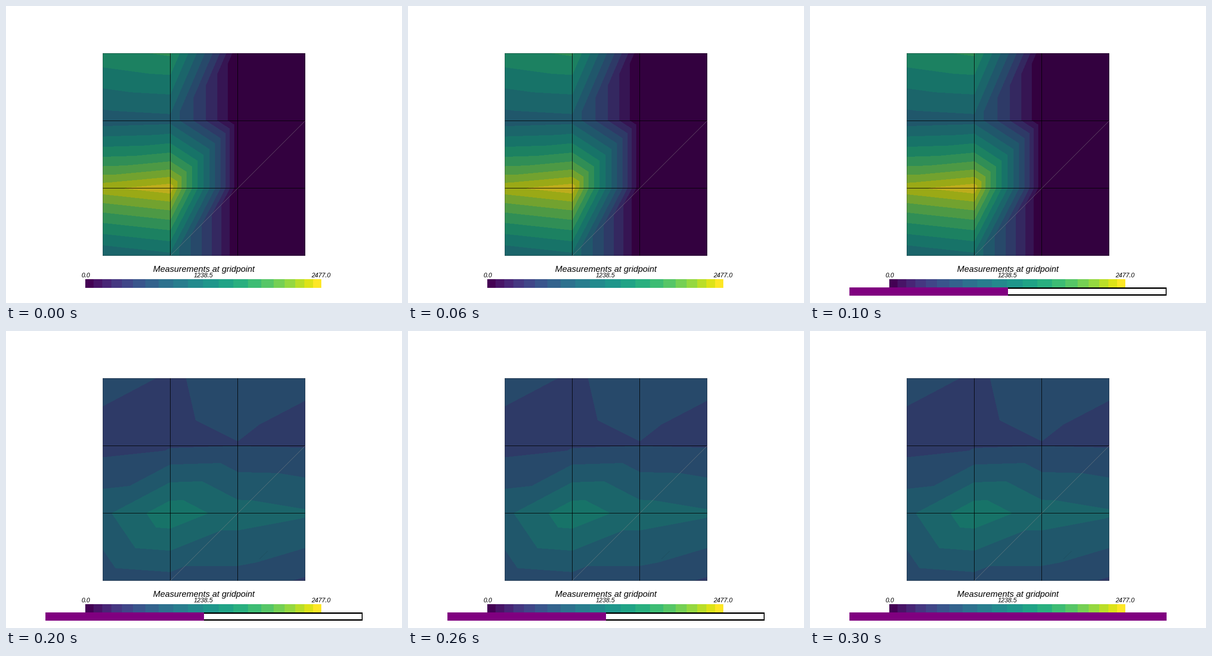
A matplotlib script that plays this animation: 864x648 px, repeating every 0.4 s.

```python
import numpy as np
import matplotlib.pyplot as plt
from matplotlib.animation import FuncAnimation
from matplotlib.patches import Rectangle
from matplotlib.tri import Triangulation

W, H = 864, 648
LEFT, RIGHT, TOP, BOTTOM = 211, 653, 103, 545
N = 4            # grid points per side
PEAK = 2477
SHADING = 0.75   # the lit surface is darker than the scalar bar

# Measurements at the grid points, bottom row first
FIRST = [[1060, 1200, 0, 0],
         [2338, PEAK, 0, 0],
         [930, 972, 0, 0],
         [1621, 1715, 0, 0]]
SECOND = [[705, 752, 751, 615],
          [990, 1410, 1147, 1073],
          [570, 615, 640, 628],
          [695, 629, 690, 651]]

fig = plt.figure(figsize=(W / 72, H / 72), dpi=72, facecolor="white")
ax = fig.add_axes([0, 0, 1, 1])
ax.axis("off")


def bands(n, bulge, shade=1):
    """Edges from 0 to 1 of n bands, widest in the middle, and their colours."""
    u = np.linspace(0, 1, n + 1)
    edges = u - bulge * np.sin(2 * np.pi * u) / (2 * np.pi)
    colors = plt.get_cmap("viridis")(np.linspace(0, 1, n))[:, :3] * shade
    return edges, colors


def rect(x0, y0, x1, y1, color, z):
    return ax.add_patch(Rectangle((x0, y0), x1 - x0, y1 - y0, facecolor=color,
                                  edgecolor="none", zorder=z))


def line(x0, y0, x1, y1, color="black", lw=1, alpha=1):
    return ax.plot([x0, x1], [y0, y1], color=color, lw=lw, alpha=alpha,
                   zorder=3, snap=False, solid_capstyle="butt")[0]


def label(x, y, text, size):
    ax.text(x, y, text, fontsize=size, family="Liberation Sans",
            style="italic", ha="center", va="baseline", zorder=5)


def make_mesh():
    xs, ys = np.meshgrid(np.linspace(LEFT, RIGHT, N),
                         np.linspace(BOTTOM, TOP, N))
    cells = []
    for r in range(N - 1):
        for c in range(N - 1):
            a = r * N + c
            cells += [(a, a + 1, a + N + 1), (a, a + N + 1, a + N)]
    return Triangulation(xs.ravel(), ys.ravel(), cells)


mesh = make_mesh()
edges, shades = bands(14, 0.2, SHADING)
levels = edges * PEAK * 1.02
levels[0] = -1


def surface(values):
    return ax.tricontourf(mesh, np.ravel(values).astype(float), levels=levels,
                          colors=shades, antialiased=False, zorder=1)


surfaces = [surface(FIRST), surface(SECOND)]
scratch = line(553, 497.5, 571, 480, "#1f4c5c", 0.8, 0.8)

# Mesh edges: full inside, faint on the rim
for k in range(N):
    alpha = 1 if 0 < k < N - 1 else 0.3
    shift = 0.5 if k < N - 1 else -0.5
    x = int(LEFT + k * (RIGHT - LEFT) / (N - 1)) + shift
    y = int(TOP + k * (BOTTOM - TOP) / (N - 1)) + shift
    line(x, TOP, x, BOTTOM, alpha=alpha)
    line(LEFT, y, RIGHT, y, alpha=alpha)
line(358.3, BOTTOM, RIGHT, 250.3, "#8c8c8c", 0.6, 0.75)

# Scalar bar
edges, colors = bands(20, 0.3)
stops = np.round(173 + 515 * edges)
for x0, x1, color in zip(stops, stops[1:], colors):
    rect(x0, 596, x1, 615, color, 4)
label(432, 580, "Measurements at gridpoint", 18.75)
for part in (0, 0.5, 1):
    label(173.5 + 514 * part, 592, f"{PEAK * part:.1f}", 13.8)

# Progress bar
progress = [rect(86, 614, 778, 632, "black", 6),
            rect(88, 617, 775.5, 629, "white", 7),
            rect(86, 614, 778, 632, "purple", 8)]

ax.set_xlim(0, W)
ax.set_ylim(H, 0)


def update(i):
    step = i // 2
    for k, s in enumerate(surfaces):
        s.set_visible(k == step)
    scratch.set_visible(step == 1)
    done = (i + 1) // 2 / 2
    for box in progress:
        box.set_visible(done > 0)
    progress[-1].set_width(692 * done)
    return []


anim = FuncAnimation(fig, update, frames=4, interval=100, repeat=True,
                     repeat_delay=0, init_func=lambda: update(0))
plt.show()
```
